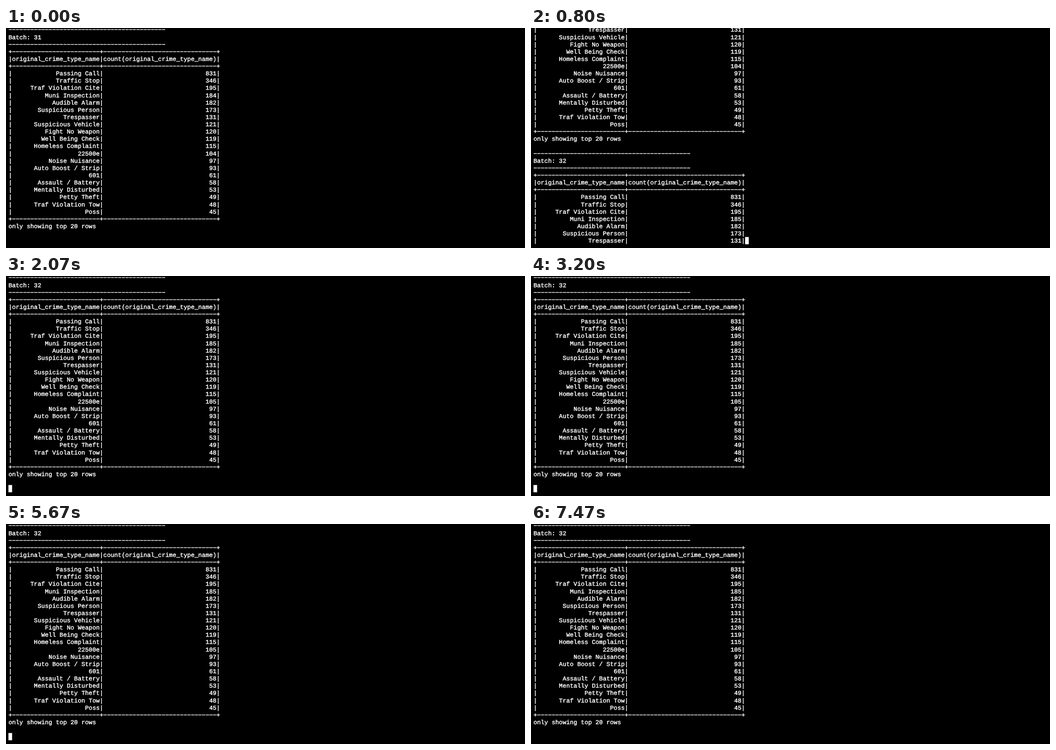
Animation, 1147 px wide and 488 px high, one loop 8 s. Source, as an HTML page with a canvas:

```html
<!DOCTYPE html>
<html lang="en">
<head>
<meta charset="utf-8">
<title>Console output</title>
<style>
  html, body { margin: 0; width: 100%; height: 100%; overflow: hidden; background: #000; }
  canvas { display: block; }
</style>
</head>
<body>
<canvas id="screen" width="1147" height="488"></canvas>
<script>
const ctx = document.getElementById("screen").getContext("2d");
const LOOP = 8000;
const LEFT = 5.4, TOP = -4.2, CELL = 8.065, LINE = 16.13, BASELINE = 12.6;
const ROWS = 30;

// Moments at which the cursor turns on or off, starting from off.
const BLINKS = [400, 1400, 2070, 2600, 3200, 3800, 4470, 5070, 5670, 6270, 6800, 7470];

const counts = {
  "Passing Call": 831, "Traffic Stop": 346, "Traf Violation Cite": 195,
  "Muni Inspection": 184, "Audible Alarm": 182, "Suspicious Person": 173,
  "Trespasser": 131, "Suspicious Vehicle": 121, "Fight No Weapon": 120,
  "Well Being Check": 119, "Homeless Complaint": 115, "22500e": 104,
  "Noise Nuisance": 97, "Auto Boost / Strip": 93, "601": 61,
  "Assault / Battery": 58, "Mentally Disturbed": 53, "Petty Theft": 49,
  "Traf Violation Tow": 48, "Poss": 45
};

function batch(number, changes) {
  const rule = "-".repeat(43);
  const border = `+${"-".repeat(24)}+${"-".repeat(31)}+`;
  const row = (name, count) => `|${name.padStart(24)}|${String(count).padStart(31)}|`;
  // Sorting keeps the numeric name in its ranked place.
  const data = Object.entries({ ...counts, ...changes }).sort((a, b) => b[1] - a[1]);
  return [
    rule, `Batch: ${number}`, rule,
    border, row("original_crime_type_name", "count(original_crime_type_name)"), border,
    ...data.map(([name, count]) => row(name, count)),
    border, "only showing top 20 rows", ""
  ];
}

const first = batch(31);
const second = batch(32, { "Muni Inspection": 185, "22500e": 105 });

// Everything printed so far; the last line holds the cursor.
function printed(t) {
  if (t < 800) return [...first, ""];
  if (t < 870) return [...first, ...second.slice(0, 13)];
  return [...second, ""];
}

function drawLine(text, row) {
  const y = TOP + row * LINE + BASELINE;
  [...text].forEach((char, col) => {
    if (char === " ") return;
    const glyph = char === "-" ? "\u2212" : char;
    const x = LEFT + col * CELL;
    ctx.fillText(glyph, x, y);
    ctx.strokeText(glyph, x, y);
  });
}

function draw(lines, cursorOn) {
  ctx.fillStyle = "#000";
  ctx.fillRect(0, 0, 1147, 488);
  ctx.fillStyle = ctx.strokeStyle = "#fff";
  ctx.lineWidth = 0.5;
  ctx.font = '13.44px "Liberation Mono", "Courier New", monospace';
  ctx.textRendering = "geometricPrecision";
  lines.forEach(drawLine);
  if (cursorOn) {
    const last = ROWS - 1;
    ctx.fillRect(LEFT + lines[last].length * CELL, TOP + last * LINE, CELL, LINE);
  }
}

let shown = "";
function frame(now) {
  const t = now % LOOP;
  const lines = printed(t).slice(-ROWS);
  const cursorOn = BLINKS.filter(time => t >= time).length % 2 === 1;
  const state = lines.join("\n") + cursorOn;
  if (state !== shown) draw(lines, cursorOn);
  shown = state;
  requestAnimationFrame(frame);
}
frame(performance.now());
</script>
</body>
</html>
```
